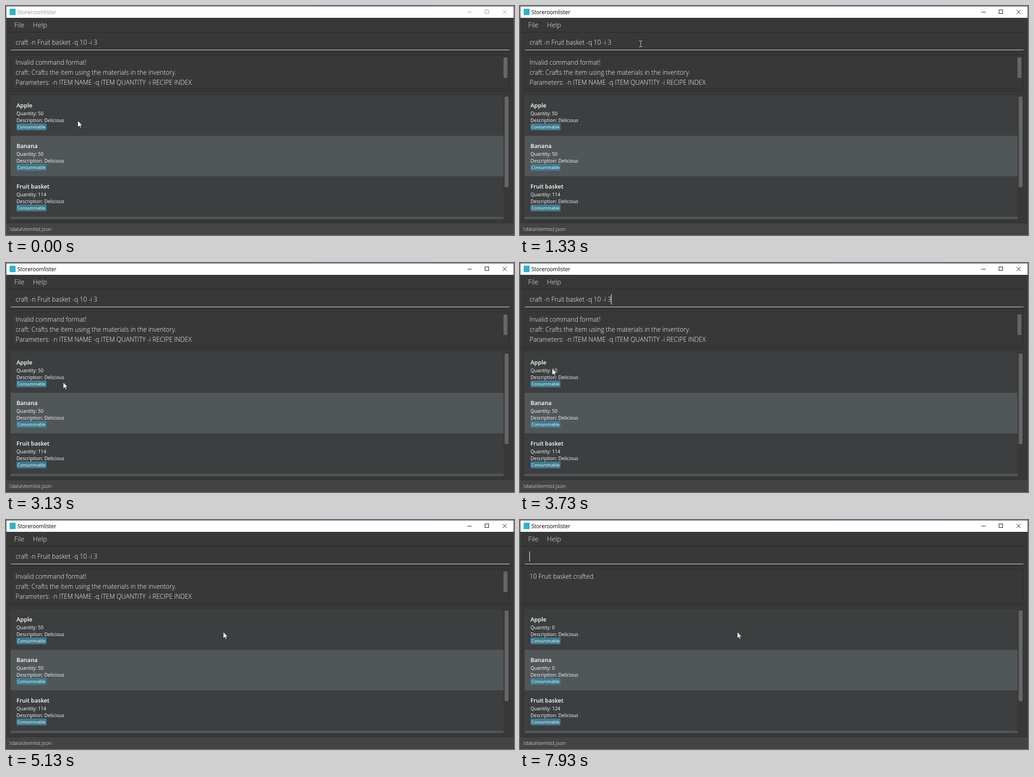
Write an HTML page with a canvas that moves like this. It is 1114 px wide and 503 px high and loops after 8 s.

```html
<!DOCTYPE html>
<html lang="en">
<head>
<meta charset="utf-8">
<title>Storeroomlister</title>
<style>
  html, body { margin: 0; width: 100%; height: 100%; overflow: hidden; background: #383838; }
  canvas { display: block; }
</style>
</head>
<body>
<canvas id="stage" width="1114" height="503"></canvas>
<script>
const ctx = document.getElementById('stage').getContext('2d');
const W = 1114, H = 503, LOOP = 8000, STEP = 200 / 3;

const COMMAND = 'craft -n Fruit basket -q 10 -i 3';
const HELP = [
  'Invalid command format!',
  'craft: Crafts the item using the materials in the inventory.',
  'Parameters: -n ITEM NAME -q ITEM QUANTITY -i RECIPE INDEX'
];
const ITEMS = [
  { name: 'Apple', stock: 50, change: -50 },
  { name: 'Banana', stock: 50, change: -50 },
  { name: 'Fruit basket', stock: 114, change: 10 }
];

const font = (size, weight = 400) => `${weight} ${size}px "Open Sans", "Noto Sans", sans-serif`;
const FONT = {
  title: font(11.7), menu: font(14.9, 300), input: font(13.9, 300),
  name: font(12.6, 600), detail: font(10.4), tag: font(9.1), status: font(11.6, 300)
};
const INPUT_X = 21, LINE = 22, ROW = 89;

// Moments of the scene, in ms
const ACTIVATE = 390, FOCUS = 820, SELECT = 1860, DESELECT = 2610, BLINK = 5910, CRAFT = 5990;

// Pointer strokes, each starting where the last one ended
const HOME = { x: 157, y: 252 };
const MOVES = [
  { from: 70, to: 733, x: 264, y: 83 },
  { from: 1800, to: 2133, x: 3, y: 91 },
  { from: 2270, to: 2533, x: 211, y: 70 },
  { from: 2800, to: 3300, x: 95, y: 329 },
  { from: 3300, to: 3733, x: 70, y: 232 },
  { from: 3870, to: 4300, x: 66, y: 378 },
  { from: 4300, to: 4733, x: 476, y: 246 }
];
const ARROW = new Path2D('M.5 0V13.8L3.8 11 6 15.8 8 14.9 5.9 10.2H10.2Z');

function rect(x, y, w, h, color) {
  ctx.fillStyle = color;
  ctx.fillRect(x, y, w, h);
}

function round(x, y, w, h, color) {
  ctx.fillStyle = color;
  ctx.beginPath();
  ctx.roundRect(x, y, w, h, 2);
  ctx.fill();
}

function frame(x, y, w, h, color) {
  ctx.strokeStyle = color;
  ctx.lineWidth = 1;
  ctx.strokeRect(x + .5, y + .5, w - 1, h - 1);
}

function text(str, x, y, style, color = '#fff') {
  ctx.font = style;
  ctx.fillStyle = color;
  ctx.fillText(str, x, y);
}

function pointerAt(t) {
  let { x, y } = HOME;
  for (const m of MOVES) {
    const u = Math.min(1, Math.max(0, (t - m.from) / (m.to - m.from)));
    const k = u * u * (3 - 2 * u);
    x += (m.x - x) * k;
    y += (m.y - y) * k;
  }
  return { x: Math.round(x), y: Math.round(y) };
}

function caretVisible(t) {
  if (t < FOCUS) return false;
  if (t >= SELECT && t < DESELECT) return true;
  const start = t >= BLINK ? BLINK : t >= DESELECT ? DESELECT : FOCUS;
  return (t - start) % 1000 < 500;
}

function drawTitleBar(active) {
  const ink = active ? '#000' : '#999';
  rect(0, 0, W, 26, '#fff');
  rect(8, 6, 13, 14, '#2cb3c9');
  text('Storeroomlister', 25, 17.5, FONT.title, ink);
  rect(1012, 13, 9, 1, ink);
  frame(1050, 8, 9, 9, ink);
  ctx.beginPath();
  ctx.moveTo(1089, 8.5); ctx.lineTo(1098, 17.5);
  ctx.moveTo(1098, 8.5); ctx.lineTo(1089, 17.5);
  ctx.stroke();
}

function drawPanes() {
  rect(0, 26, W, H - 26, '#383838');
  text('File', 18, 47, FONT.menu, '#f0f0f0');
  text('Help', 59, 47, FONT.menu, '#f0f0f0');
  for (const y of [57, 101, 186]) rect(1, y, W - 2, 1, '#292929');
  rect(11, 96, 1093, 1, '#e8e8e8');
  frame(10, 107, 1094, 75, '#2b2b2b');
  rect(1, 476, W - 2, 1, '#303030');
  rect(1, 477, W - 2, 25, '#444');
  text('.\\data\\itemlist.json', 4.5, 494, FONT.status);
}

function drawInput(t, pointerX) {
  ctx.font = FONT.input;
  const caretX = n => INPUT_X + ctx.measureText(COMMAND.slice(0, n)).width;
  const crafted = t >= CRAFT, end = COMMAND.length;
  let caret = crafted ? 0 : end;
  if (t >= SELECT && t < DESELECT) {
    // The drag only ever extends the selection to the left
    const reach = t < MOVES[1].to ? pointerX : 0;
    while (caret > 0 && caretX(caret) > reach) caret--;
    rect(caretX(caret), 69, caretX(end) - caretX(caret), LINE, '#0096c9');
  }
  if (!crafted) text(COMMAND, INPUT_X, 85, FONT.input);
  if (caretVisible(t)) rect(caretX(caret) - .5, 69, 1.1, LINE, '#fff');
}

function drawResult(crafted) {
  const lines = crafted ? ['10 Fruit basket crafted.'] : HELP;
  lines.forEach((line, i) => text(line, INPUT_X, 129 + i * LINE, FONT.input));
  if (!crafted) round(1091, 113, 8.5, 45, '#666');
}

function drawList(crafted) {
  ITEMS.forEach(({ name, stock, change }, i) => {
    const y = 196 + i * ROW;
    rect(10, y, 1081, ROW, i % 2 ? '#515658' : '#3c3e3f');
    text(name, 23, y + 27, FONT.name);
    text('Quantity: ' + (crafted ? stock + change : stock), 23, y + 44, FONT.detail);
    text('Description: Delicious', 23, y + 58.5, FONT.detail);
    round(23, y + 62, 66, 15, '#3e7b91');
    text('Consummable', 25, y + 73, FONT.tag);
  });
  rect(10, 196 + ITEMS.length * ROW, 1081, 5, '#515658');
  round(1093.5, 199, 8.5, 199, '#666');
}

function drawArrow(x, y) {
  ctx.save();
  ctx.translate(x, y);
  ctx.fillStyle = '#fff';
  ctx.fill(ARROW);
  ctx.strokeStyle = '#1a1a1a';
  ctx.lineWidth = .7;
  ctx.stroke(ARROW);
  ctx.restore();
}

function drawBeam(x, y) {
  const ink = '#d8d8d8';
  rect(x, y - 6, 1, 12, ink);
  for (const tip of [y - 7, y + 6]) {
    rect(x - 3, tip, 3, 1, ink);
    rect(x + 1, tip, 3, 1, ink);
  }
}

function draw(time) {
  const t = Math.floor((time + 4) / STEP) * STEP;
  const active = t >= ACTIVATE, crafted = t >= CRAFT;
  const { x, y } = pointerAt(t);
  drawTitleBar(active);
  drawPanes();
  drawInput(t, x);
  drawResult(crafted);
  drawList(crafted);
  frame(0, 0, W, H, active ? '#444' : '#555');
  rect(676, 0, 258, 1, '#5a2d86');
  const overInput = y > 60 && y < 98;
  (overInput ? drawBeam : drawArrow)(x, y);
}

const start = performance.now();
function tick() {
  draw((performance.now() - start) % LOOP);
  requestAnimationFrame(tick);
}
tick();
</script>
</body>
</html>
```
